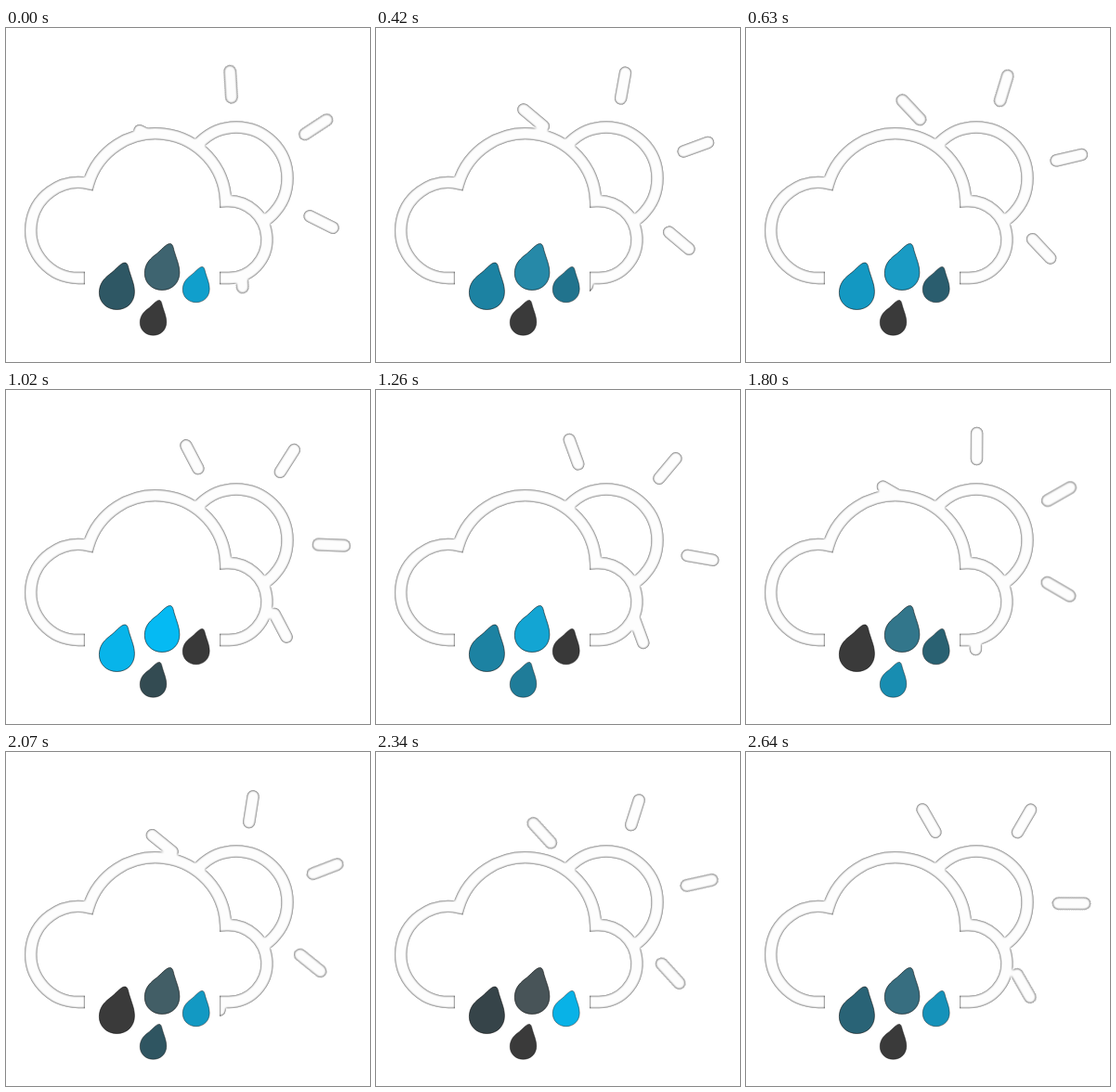
An HTML page for the animation above (2700 ms loop, 392 by 360 pixels).

```html
<!DOCTYPE html>
<html lang="en">
<head>
<meta charset="utf-8">
<title>Showers with sun</title>
<style>
  html, body { margin: 0; width: 100%; height: 100%; overflow: hidden; background: #fff; }
  svg { display: block; }
</style>
</head>
<body>
<svg width="392" height="360" viewBox="0 0 392 360">
  <defs>
    <filter id="soft-edge" filterUnits="userSpaceOnUse" x="0" y="0" width="392" height="360" color-interpolation-filters="sRGB">
      <feComponentTransfer in="SourceAlpha" result="outside">
        <feFuncA type="linear" slope="-1" intercept="1"/>
      </feComponentTransfer>
      <feGaussianBlur in="outside" stdDeviation="1"/>
      <feComposite in2="SourceAlpha" operator="in" result="shade"/>
      <feMerge><feMergeNode in="SourceGraphic"/><feMergeNode in="shade"/></feMerge>
    </filter>
    <path id="cloud" d="M85 269.5H78A51.5 51.5 0 1 1 88.8 167.6A75.5 75.5 0 0 1 236.6 186.6A41.5 41.5 0 1 1 240 269.5H230"/>
    <mask id="behind" maskUnits="userSpaceOnUse" x="0" y="0" width="392" height="360">
      <path fill="#fff" d="M0 0H392V360H0Z"/>
      <use href="#cloud"/>
      <path d="M85 269H230V300H85Z"/>
    </mask>
    <path id="drop" d="M27.5 .5C30 .5 31 3 32 8C35 18 38 24 38 32C38 43 30 51 19 51C8 51 0 43 0 33C0 24 4 18.5 11 13C18 8 23 .5 27.5 .5Z"/>
  </defs>
  <g filter="url(#soft-edge)" fill="none" stroke="#fdfdfd" stroke-width="13.4">
    <g mask="url(#behind)">
      <circle cx="248" cy="162" r="55"/>
      <g id="rays" stroke-linecap="round"></g>
    </g>
    <use href="#cloud"/>
  </g>
  <g id="drops" stroke="#000" stroke-opacity=".55"></g>
</svg>
<script>
const LOOP = 2700, STEP = 30;
const PULSE = 2520, HALF = PULSE / 2, QUARTER = PULSE / 4;
const BLUE = [4, 188, 246];

// Each drop brightens until its peak time, then darkens.
const drops = [
  { x: 100.4, y: 252.5, scale: 1, dark: 58, peak: 980, rise: HALF, fall: QUARTER },
  { x: 149.3, y: 232, scale: .99, dark: 77, peak: 1000, rise: HALF, fall: HALF },
  { x: 190.3, y: 257, scale: .76, dark: 57, peak: 2240, rise: QUARTER, fall: HALF },
  { x: 144.3, y: 293, scale: .75, dark: 58, peak: 1570, rise: QUARTER, fall: QUARTER }
];

function add(parent, tag, attributes) {
  const el = document.createElementNS("http://www.w3.org/2000/svg", tag);
  for (const name in attributes) el.setAttribute(name, attributes[name]);
  return document.getElementById(parent).appendChild(el);
}

for (let i = 0; i < 6; i++) {
  add("rays", "path", { d: "M88.5 0H116.5", transform: `rotate(${i * 60})` });
}
for (const drop of drops) {
  const { x, y, scale } = drop;
  drop.el = add("drops", "use", { href: "#drop", transform: `translate(${x} ${y}) scale(${scale})` });
}

const rays = document.getElementById("rays");

// Steady turn with a small skip ahead now and then.
function rayAngle(t) {
  return 26.7 + .032 * t + 3 * Math.floor(t / 850);
}

function brightness({ peak, rise, fall }, t) {
  const offset = (t - peak + HALF + PULSE) % PULSE - HALF;
  return Math.max(0, 1 - Math.abs(offset) / (offset < 0 ? rise : fall));
}

function draw(now) {
  const t = Math.floor(now % LOOP / STEP) * STEP;
  rays.setAttribute("transform", `translate(248 163) rotate(${rayAngle(t)})`);
  for (const drop of drops) {
    const level = brightness(drop, t);
    const color = BLUE.map(c => Math.round(drop.dark + (c - drop.dark) * level));
    drop.el.setAttribute("fill", `rgb(${color})`);
  }
}

function tick() {
  draw(performance.now());
  requestAnimationFrame(tick);
}
tick();
</script>
</body>
</html>
```
